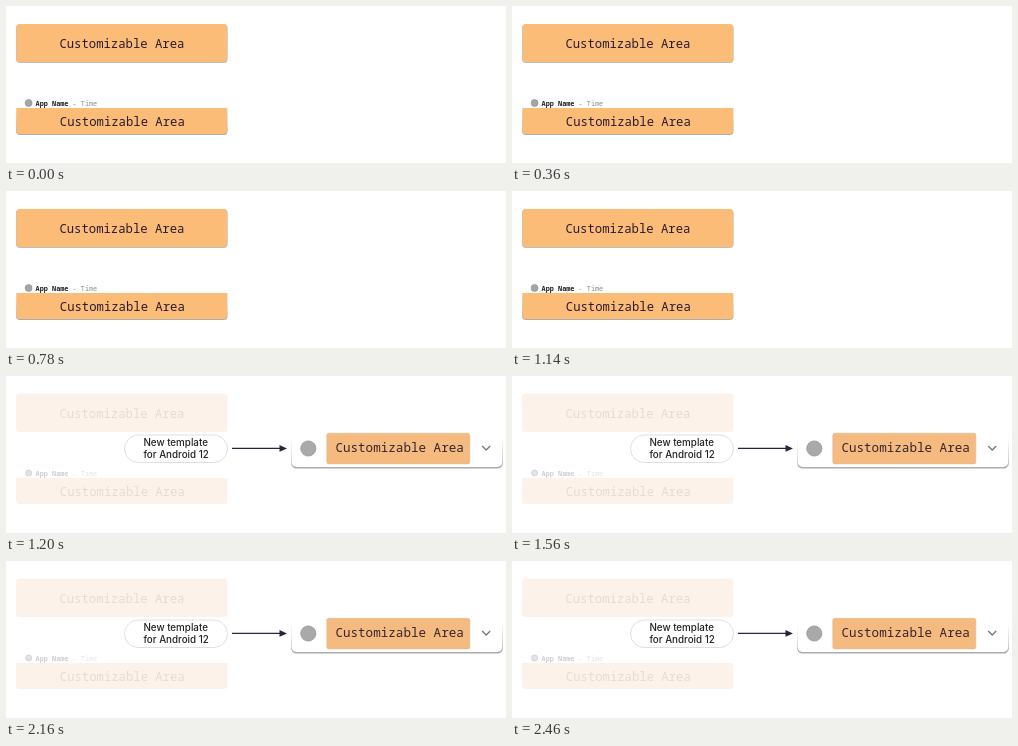
An HTML page that plays this animation: 500x157 px, repeating every 2.49 s.

```html
<!DOCTYPE html>
<html lang="en">
<head>
<meta charset="utf-8">
<title>Notification templates</title>
<style>
  html, body { margin: 0; width: 100%; height: 100%; overflow: hidden; background: #fff; }
  svg { display: block; width: 500px; height: 157px; }
  .mono { font-family: "Noto Sans Mono", "DejaVu Sans Mono", monospace; }
  .area { font-size: 12.25px; }
  .wide { font-size: 12.6px; }
  .head { font-size: 6.85px; }
  .bold { font-weight: 700; }
  .label { font: 500 9.8px Inter, sans-serif; fill: #222; }
  .before { animation: before 2490ms step-end infinite; }
  .after { animation: after 2490ms step-end infinite; }
  /* hard cut at 1200 ms */
  @keyframes before { 0% { visibility: visible; } 48.19% { visibility: hidden; } }
  @keyframes after { 0% { visibility: hidden; } 48.19% { visibility: visible; } }
</style>
</head>
<body>
<svg viewBox="0 0 500 157">
  <defs>
    <filter id="soft" x="-10%" y="-30%" width="120%" height="160%">
      <feGaussianBlur stdDeviation=".6"/>
    </filter>
    <linearGradient id="edge" x1="0" y1="0" x2="0" y2="1">
      <stop offset=".1" stop-color="#bbb" stop-opacity="0"/>
      <stop offset="1" stop-color="#aaa"/>
    </linearGradient>
  </defs>

  <g class="before">
    <rect x="10" y="18.2" width="211.6" height="38.8" rx="4" fill="#bdbdc2" filter="url(#soft)"/>
    <rect x="10.4" y="18" width="210.8" height="38" rx="3.5" fill="#fbbc77"/>
    <text class="mono area" x="53.4" y="41.6" fill="#2b1a30">Customizable Area</text>

    <path d="M10 93V125a4 4 0 0 0 4 4H217.6a4 4 0 0 0 4-4V93Z" fill="url(#edge)" filter="url(#soft)"/>
    <path d="M10.4 92H221.2V102H10.4Z" fill="#fff"/>
    <path d="M10.4 102H221.2V124.5a3.5 3.5 0 0 1-3.5 3.5H13.9a3.5 3.5 0 0 1-3.5-3.5Z" fill="#fbbc77"/>
    <circle cx="22.6" cy="97" r="3.5" fill="#a5a5a5" stroke="#8b8b8b" stroke-width=".6"/>
    <text class="mono head" x="29.6" y="99.6" fill="#8a8a8a"><tspan class="bold" fill="#202020">App Name</tspan> - Time</text>
    <text class="mono area" x="53.8" y="119.8" fill="#2b1a30">Customizable Area</text>
  </g>

  <g class="after">
    <rect x="10" y="17.5" width="211.4" height="38.5" rx="3.5" fill="#fdf2ea"/>
    <text class="mono area" x="53.4" y="41.6" fill="#e6dad6">Customizable Area</text>
    <path d="M10 102H221.4V124.5a3.5 3.5 0 0 1-3.5 3.5H13.5a3.5 3.5 0 0 1-3.5-3.5Z" fill="#fdf2ea"/>
    <circle cx="22.6" cy="97" r="3" fill="#e4e2e8" stroke="#cfcdd6" stroke-width=".8"/>
    <text class="mono head" x="29.6" y="99.6" fill="#e4e2e8"><tspan class="bold" fill="#d0cdd6">App Name</tspan> - Time</text>
    <text class="mono area" x="53.8" y="119.8" fill="#e6dad6">Customizable Area</text>

    <rect x="118.5" y="59" width="103" height="27.5" rx="13.75" fill="#fff" stroke="#dadce0" stroke-width=".9"/>
    <text class="label" x="137.4" y="70.4">New template</text>
    <text class="label" x="137.4" y="82.3">for Android 12</text>

    <path d="M226 72.4H275" stroke="#27263f" stroke-width="1.4"/>
    <path d="M273.5 69L281 72.4L273.5 75.8Z" fill="#27263f"/>

    <path d="M285 57V87a5.5 5.5 0 0 0 5.5 5.5H491.5a5.5 5.5 0 0 0 5.5-5.5V57Z" fill="url(#edge)" filter="url(#soft)"/>
    <path d="M285.6 54V86a5 5 0 0 0 5 5H491.2a5 5 0 0 0 5-5V54Z" fill="#fff"/>
    <circle cx="302.3" cy="72.5" r="7.6" fill="#a9a9a9" stroke="#909090" stroke-width=".7"/>
    <rect x="320.8" y="57.3" width="143" height="30.6" rx="2" fill="#f4ba80" stroke="#e3b78b" stroke-width=".6"/>
    <text class="mono wide" x="329.4" y="76" fill="#38242c">Customizable Area</text>
    <path d="M476.2 70L480.2 74L484.2 70" fill="none" stroke="#777" stroke-width="1.3"/>
  </g>
</svg>
</body>
</html>
```
